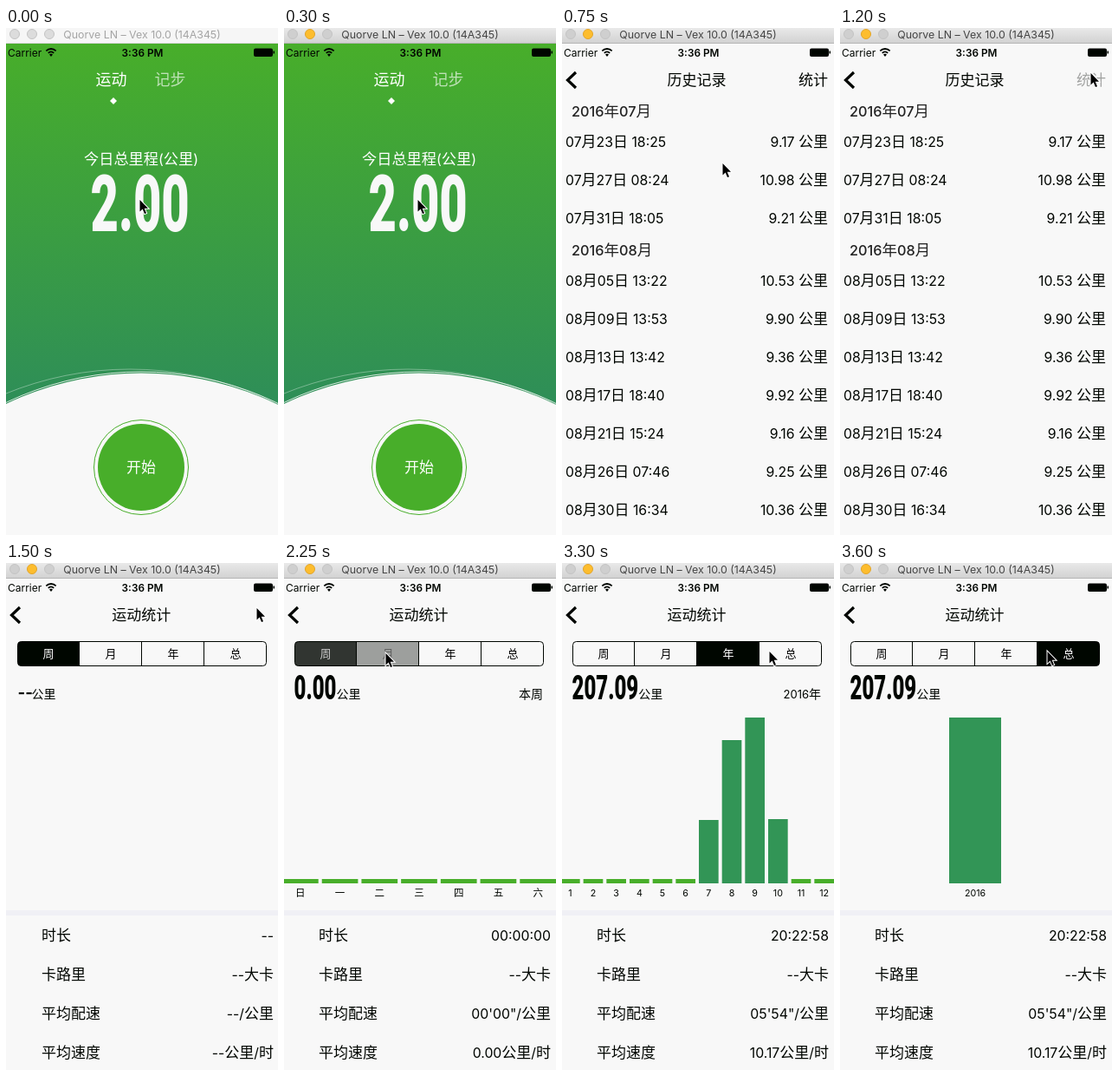
An HTML page with a canvas that plays this animation: 314 px wide and 584 px high, repeating every 3750 ms.

```html
<!DOCTYPE html>
<html lang="zh">
<head>
<meta charset="utf-8">
<title>运动统计</title>
<style>
  html, body { margin: 0; width: 100%; height: 100%; overflow: hidden; background: #f8f8f8; }
  canvas { display: block; width: 314px; height: 584px; }
</style>
</head>
<body>
<canvas id="stage"></canvas>
<script>
const W = 314, H = 584, LOOP = 3750, STEP = 150;
const SCREEN = { left: -4, top: 17, width: 320 };
const GREEN = '#48ae2a', DEEP_GREEN = '#329556', PAPER = '#f8f8f8', INK = '#000500';
const FONT = 'Inter, "Noto Sans CJK SC", "Noto Sans CJK", sans-serif';

const canvas = document.getElementById('stage');
const ctx = canvas.getContext('2d');
const ratio = window.devicePixelRatio || 1;
canvas.width = W * ratio;
canvas.height = H * ratio;

const history = [
  ['2016年07月', 96],
  ['07月23日 18:25', 131, '9.17'], ['07月27日 08:24', 175, '10.98'], ['07月31日 18:05', 219, '9.21'],
  ['2016年08月', 256],
  ['08月05日 13:22', 291, '10.53'], ['08月09日 13:53', 335, '9.90'], ['08月13日 13:42', 379, '9.36'],
  ['08月17日 18:40', 423, '9.92'], ['08月21日 15:24', 467, '9.16'], ['08月26日 07:46', 511, '9.25'],
  ['08月30日 16:34', 555, '10.36']
];

const bars = (count, label, heights = {}) =>
  Array.from({ length: count }, (_, i) => ({ label: label(i), height: heights[i] || 5 }));
const yearRows = ['20:22:58', '--大卡', '05\'54"/公里', '10.17公里/时'];
const views = {
  empty: { rows: ['--', '--大卡', '--/公里', '--公里/时'], bars: [] },
  week: {
    total: '0.00', period: '本周', rows: ['00:00:00', '--大卡', '00\'00"/公里', '0.00公里/时'],
    bars: bars(7, i => '日一二三四五六'[i])
  },
  month: {
    total: '29.72', period: '2016年10月', rows: ['02:56:20', '--大卡', '05\'56"/公里', '10.11公里/时'],
    bars: bars(31, i => i === 0 || i % 5 === 4 ? String(i + 1) : '', { 4: 191, 11: 184, 19: 187 })
  },
  year: {
    total: '207.09', period: '2016年', rows: yearRows,
    bars: bars(12, i => String(i + 1), { 6: 73, 7: 165, 8: 191, 9: 74 })
  },
  all: { total: '207.09', rows: yearRows, bars: bars(1, () => '2016', { 0: 191 }) }
};

// Pointer stops: time, x, y
const pointerPath = [
  [0, 154, 197], [450, 154, 197], [600, 160, 190], [750, 185, 155], [900, 240, 100],
  [1050, 289, 51], [1500, 289, 51], [1650, 284, 55], [1800, 216, 80], [1950, 150, 91],
  [2100, 117, 103], [2400, 117, 103], [2550, 140, 102], [2700, 178, 98], [2850, 187, 98],
  [3000, 187, 98], [3150, 221, 102], [3300, 239, 101], [3750, 239, 101]
];

// Segment taps: time, tapped cell, opacity of the old and new cell during the fade
const taps = [[2250, 1, 0.8, 0.37], [2850, 2, 0.27, 0.82], [3450, 3, 0.8, 0.37]];

// Chinese and Latin runs are set at slightly different optical sizes.
function text(str, x, y, size, { align = 'left', color = INK, weight = 400, alpha = 1 } = {}) {
  const runs = (str.match(/[\u3000-\u9fff]+|[^\u3000-\u9fff]+/g) || []).map(run => {
    const px = /[\u3000-\u9fff]/.test(run) ? size : size * 0.93;
    const font = `${weight} ${px}px ${FONT}`;
    ctx.font = font;
    return { run, font, width: ctx.measureText(run).width };
  });
  const total = runs.reduce((sum, r) => sum + r.width, 0);
  x -= { left: 0, center: total / 2, right: total }[align];
  ctx.save();
  ctx.globalAlpha *= alpha;
  ctx.fillStyle = color;
  for (const r of runs) {
    ctx.font = r.font;
    ctx.fillText(r.run, x, y + size * 0.36);
    x += r.width;
  }
  ctx.restore();
}

// Condensed display numerals; returns the advance width.
function numerals(str, x, baseline, size, color) {
  const condense = 0.615;
  ctx.save();
  ctx.translate(x, baseline);
  ctx.scale(condense, 1);
  ctx.font = `900 ${size}px Roboto, sans-serif`;
  ctx.fillStyle = color;
  ctx.fillText(str, 0, 0);
  const width = ctx.measureText(str).width * condense;
  ctx.restore();
  return width;
}

function rect(x, y, w, h, fill) {
  ctx.fillStyle = fill;
  ctx.fillRect(x, y, w, h);
}

function circle(x, y, r, fill, stroke) {
  ctx.beginPath();
  ctx.arc(x, y, r, 0, Math.PI * 2);
  if (fill) { ctx.fillStyle = fill; ctx.fill(); }
  if (stroke) { ctx.lineWidth = 1; ctx.strokeStyle = stroke; ctx.stroke(); }
}

function polygon(points, fill, outline) {
  ctx.beginPath();
  points.forEach(([x, y]) => ctx.lineTo(x, y));
  ctx.closePath();
  if (outline) { ctx.lineWidth = 2; ctx.strokeStyle = outline; ctx.stroke(); }
  ctx.fillStyle = fill;
  ctx.fill();
}

function vertical(y0, y1, from, to) {
  const gradient = ctx.createLinearGradient(0, y0, 0, y1);
  gradient.addColorStop(0, from);
  gradient.addColorStop(1, to);
  return gradient;
}

function drawHome() {
  rect(SCREEN.left, SCREEN.top, SCREEN.width, H, vertical(17, 433, GREEN, '#2e8e58'));
  circle(143, 772, 379, null, 'rgba(255,255,255,.35)');
  circle(156, 757, 361, null, 'rgba(255,255,255,.8)');
  circle(156, 757, 359.5, PAPER);
  text('今日总里程(公里)', 156, 151, 17.2, { color: '#fff', align: 'center' });
  numerals('2.00', 97.5, 234, 91, PAPER);
  circle(156, 506, 50, GREEN);
  circle(156, 506, 54.5, null, GREEN);
  text('开始', 156, 506, 17, { color: '#fff', align: 'center' });
}

function drawHomeTabs() {
  const white = { color: '#fff', align: 'center' };
  text('运动', 121.5, 60, 18, white);
  text('记步', 189.5, 60, 18, { ...white, alpha: 0.65 });
  polygon([[124, 80], [128, 84], [124, 88], [120, 84]], '#fff');
}

function drawHistory() {
  for (const [label, y, distance] of history) {
    if (distance) {
      text(label, 4, y, 17);
      text(distance + ' 公里', 307, y, 17, { align: 'right' });
    } else {
      text(label, 11, y, 17.5, { weight: 500, color: '#222' });
    }
  }
}

function segmentOpacity(t) {
  const cells = [1, 0, 0, 0];
  for (const [time, cell, before, after] of taps) {
    if (t < time) break;
    const fading = t < time + STEP;
    cells[cell - 1] = fading ? before : 0;
    cells[cell] = fading ? after : 1;
  }
  return cells;
}

function drawSegments(t) {
  ctx.save();
  ctx.beginPath();
  ctx.roundRect(12.5, 90.5, 287, 28, 4);
  ctx.save();
  ctx.clip();
  segmentOpacity(t).forEach((opacity, i) => {
    rect(12 + i * 72, 90, 72, 29, `rgba(0,6,0,${opacity})`);
    const shade = Math.round(opacity * 255);
    text('周月年总'[i], 48 + i * 72, 104, 13, { align: 'center', color: `rgb(${shade},${shade},${shade})` });
  });
  ctx.restore();
  ctx.beginPath();
  ctx.roundRect(12.5, 90.5, 287, 28, 4);
  ctx.strokeStyle = INK;
  ctx.lineWidth = 1;
  ctx.stroke();
  ctx.restore();
  for (const x of [83, 155, 227]) rect(x, 90, 1, 29, INK);
}

function drawChart(items) {
  const pitch = SCREEN.width / items.length;
  const gap = items.length > 12 ? 2 : 4;
  const width = Math.min(60, pitch - gap);
  items.forEach(({ label, height }, i) => {
    const center = SCREEN.left + (i + 0.5) * pitch;
    rect(center - width / 2, 369 - height, width, height, height > 5 ? DEEP_GREEN : GREEN);
    text(label, center, 380, 11.5, { align: 'center' });
  });
}

function viewAt(t) {
  if (t < 1650) return views.empty;
  if (t < 2400) return views.week;
  if (t < 2850) return views.month;
  return t < 3600 ? views.year : views.all;
}

function drawStatistics(t) {
  const view = viewAt(t);
  drawSegments(t);
  if (view.total) {
    const width = numerals(view.total, 11.5, 157, 39, INK);
    text('公里', 11.5 + width, 151, 14);
  } else {
    text('--', 12.5, 149, 20, { weight: 700 });
    text('公里', 28.5, 151, 14);
  }
  if (view.period) text(view.period, 299, 151, 14, { align: 'right' });
  drawChart(view.bars);
  rect(SCREEN.left, 400, SCREEN.width, 6, '#f0f0f5');
  ['时长', '卡路里', '平均配速', '平均速度'].forEach((label, i) => {
    text(label, 40, 429 + i * 45, 17);
    text(view.rows[i], 308, 429 + i * 45, 17, { align: 'right' });
  });
}

// Slides the upper page in while the lower one drifts left and darkens.
function drawPush(lower, upper, offset) {
  ctx.save();
  if (offset > 0) {
    const progress = 1 - offset / SCREEN.width;
    ctx.translate(-0.3 * SCREEN.width * progress, 0);
    lower();
    ctx.restore();
    rect(0, 17, W, H, `rgba(0,0,0,${0.07 * progress})`);
    ctx.save();
    ctx.translate(offset, 0);
  }
  rect(SCREEN.left, SCREEN.top, SCREEN.width, H, PAPER);
  upper();
  ctx.restore();
}

function drawNavigation(title, offset, actionAlpha, chevronAlpha) {
  const fade = 1 - offset / SCREEN.width;
  text(title, 155.5 + offset * 0.68, 60, 17, { align: 'center', weight: 500, alpha: fade });
  text('统计', 307, 60, 17, { align: 'right', alpha: actionAlpha * fade });
  ctx.save();
  ctx.globalAlpha = chevronAlpha;
  ctx.beginPath();
  ctx.moveTo(16, 51);
  ctx.lineTo(6.5, 60);
  ctx.lineTo(16, 69);
  ctx.lineWidth = 3.2;
  ctx.strokeStyle = INK;
  ctx.stroke();
  ctx.restore();
}

function drawStatusBar() {
  text('Carrier', 2, 28, 12.9);
  text('3:36 PM', 157.5, 28, 12.7, { align: 'center', weight: 600 });
  ctx.strokeStyle = INK;
  ctx.lineWidth = 1.8;
  for (const r of [4.5, 8]) {
    ctx.beginPath();
    ctx.arc(52, 32, r, -Math.PI * 0.75, -Math.PI * 0.25);
    ctx.stroke();
  }
  polygon([[52, 33], [50, 30.6], [52, 29.6], [54, 30.6]], INK);
  ctx.beginPath();
  ctx.roundRect(286, 23.5, 22, 9.5, 2);
  ctx.fillStyle = INK;
  ctx.fill();
  rect(308.5, 26.5, 1.5, 3, INK);
}

function drawTitleBar(active) {
  rect(0, 0, W, 17, active ? vertical(0, 17, '#e9e9e9', '#d2d2d2') : '#f6f6f6');
  rect(0, 17, W, 1, active ? '#b6b6b6' : '#dadada');
  [10, 30, 50].forEach((x, i) => {
    const lit = active && i === 1;
    circle(x, 7, 5.5, lit ? '#fdbd2e' : active ? '#cfcfcf' : '#dcdcdc', lit ? '#e3a529' : '#c4c4c4');
  });
  text('Quorve LN – Vex 10.0 (14A345)', 157, 7.5, 13.3, { align: 'center', color: active ? '#444' : '#a4a4a4' });
}

function drawPointer(t) {
  const next = pointerPath.findIndex(stop => stop[0] > t);
  const [t0, x0, y0] = pointerPath[next - 1];
  const [t1, x1, y1] = pointerPath[next];
  const k = (t - t0) / (t1 - t0);
  ctx.save();
  ctx.translate(x0 + (x1 - x0) * k, y0 + (y1 - y0) * k);
  polygon([[0.5, 1], [0.5, 14.5], [3.6, 11.6], [6, 17], [8, 16.2], [5.7, 10.8], [10, 10.8]], '#000', '#fff');
  ctx.restore();
}

// Remaining distance of a push that starts at the given time
function pushOffset(t, start, rate) {
  const offset = SCREEN.width * Math.exp(-rate * (t - start) / 1000);
  return offset < 1 ? 0 : Math.round(offset);
}

function draw(t) {
  ctx.setTransform(ratio, 0, 0, ratio, 0, 0);
  rect(0, 0, W, H, PAPER);
  if (t <= 300) {
    drawHome();
    drawHomeTabs();
  } else if (t <= 1200) {
    const offset = pushOffset(t, 300, 14.4);
    drawPush(drawHome, drawHistory, offset);
    drawNavigation('历史记录', offset, t < 1200 ? 1 : 0.35, (1 - offset / SCREEN.width) ** 10);
  } else {
    const offset = pushOffset(t, 1200, 18.5);
    drawPush(drawHistory, () => drawStatistics(t), offset);
    drawNavigation('运动统计', offset, 0, 1);
  }
  drawStatusBar();
  drawTitleBar(t >= 300);
  drawPointer(t);
}

function tick() {
  const t = performance.now() % LOOP;
  draw(Math.floor(t / STEP) * STEP);
  requestAnimationFrame(tick);
}
tick();
</script>
</body>
</html>
```
